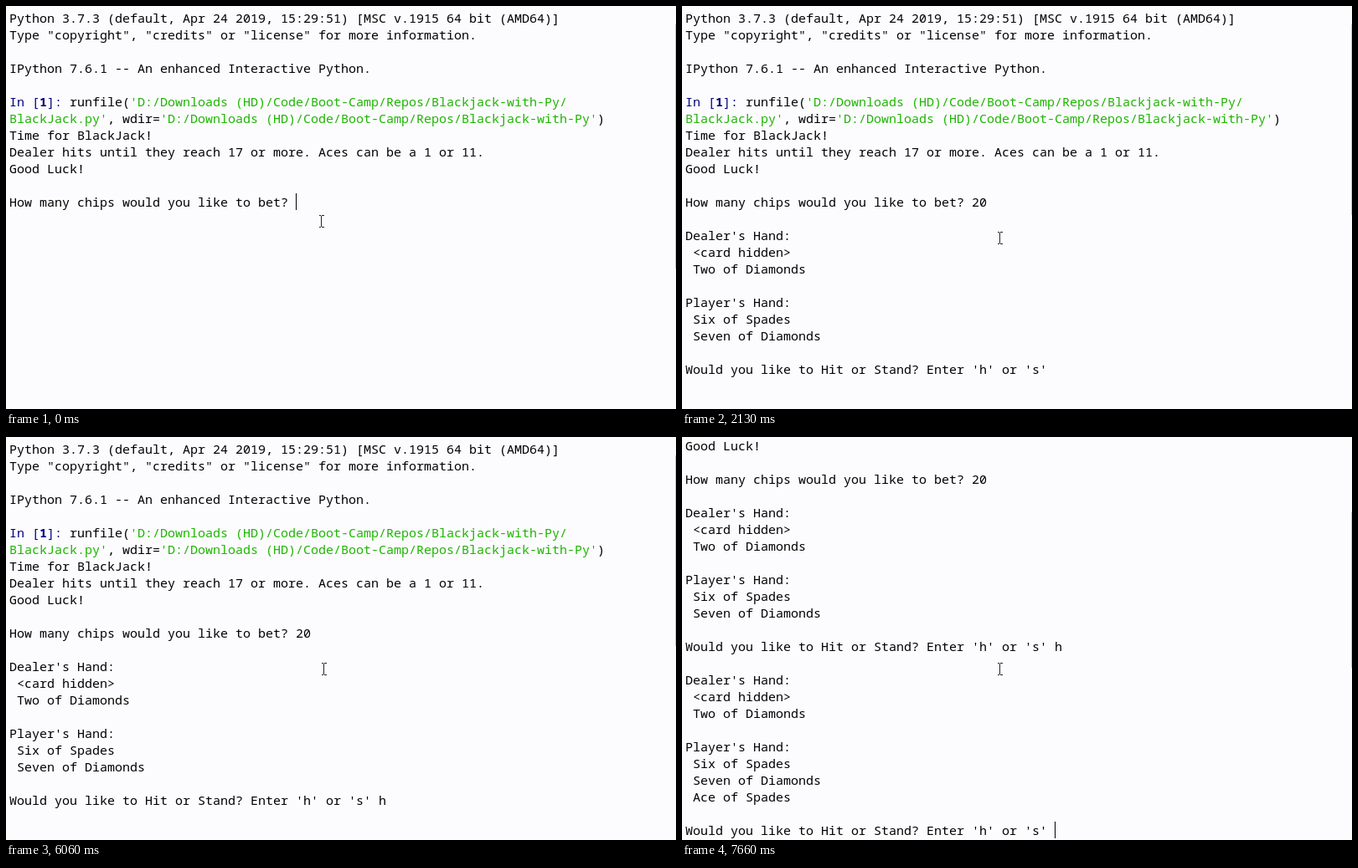
An HTML page that plays this animation: 800 by 482 pixels, repeating every 8000 ms.

```html
<!DOCTYPE html>
<html lang="en">
<head>
<meta charset="utf-8">
<title>Blackjack console</title>
<style>
  html, body { margin: 0; width: 100%; height: 100%; overflow: hidden; background: #fcfcfe; }
  #stage { position: relative; width: 800px; height: 482px; overflow: hidden; }
  pre {
    position: absolute; left: 4px; top: 4px; margin: 0;
    font: 15px/20px "Noto Sans Mono", "Liberation Mono", monospace;
    font-variant-ligatures: none; color: #000;
  }
  .prompt { color: #000080; }
  .string { color: #1db500; }
  #caret { position: absolute; width: 1px; height: 20px; background: #000; }
  #thumb { position: absolute; left: 799px; width: 1px; background: #cdcdcf; }
  #pointer { position: absolute; left: 0; top: 0; }
</style>
</head>
<body>
<div id="stage">
<pre id="console">Python 3.7.3 (default, Apr 24 2019, 15:29:51) [MSC v.1915 64 bit (AMD64)]
Type "copyright", "credits" or "license" for more information.

IPython 7.6.1 -- An enhanced Interactive Python.

<span class="prompt">In [<b>1</b>]:</span> runfile(<span class="string">'D:/Downloads (HD)/Code/Boot-Camp/Repos/Blackjack-with-Py/
BlackJack.py'</span>, wdir=<span class="string">'D:/Downloads (HD)/Code/Boot-Camp/Repos/Blackjack-with-Py'</span>)
Time for BlackJack!
Dealer hits until they reach 17 or more. Aces can be a 1 or 11.
Good Luck!

How many chips would you like to bet? <span id="session"></span><span id="caret"></span></pre>
<div id="thumb"></div>
<svg id="pointer" width="8" height="15" shape-rendering="crispEdges">
  <path d="M0.5 .5H3M4 .5H6.5M3.5 1V14M0.5 14.5H3M4 14.5H6.5" fill="none" stroke="#222"/>
</svg>
</div>
<script>
const LOOP = 8000;
const $ = id => document.getElementById(id);

const deal = (...cards) => `

Dealer's Hand:
 <card hidden>
 Two of Diamonds

Player's Hand:
${cards.map(card => ` ${card}\n`).join("")}
Would you like to Hit or Stand? Enter 'h' or 's' `;

// [time, text added to the session]
const output = [
  [1660, "2"],
  [1730, "0"],
  [2130, deal("Six of Spades", "Seven of Diamonds")],
  [5930, "h"],
  [6260, deal("Six of Spades", "Seven of Diamonds", "Ace of Spades")],
];

// Times at which the caret flips, starting visible
const caretFlips = [
  193, 730, 1260, 1660, 1800,
  2330, 2860, 3400, 3930, 4460, 5000, 5530, 6060,
  6600, 7130, 7660,
];

// [time, scroll offset, thumb top, thumb bottom]
const scrolls = [[0, 0, 22, 314], [2130, 0, 22, 250], [6260, 184, 90, 276]];

// [time, x, y]
const pointerPath = [[0, 373, 250], [60, 374, 259], [130, 376, 270], [193, 376, 273], [260, 376, 270]];

const latest = (steps, t) => steps.filter(([start]) => start <= t).pop();

function render(t) {
  const text = output.filter(([start]) => start <= t).map(([, added]) => added).join("");
  if ($("session").textContent !== text) $("session").textContent = text;

  const flips = caretFlips.filter(start => start <= t).length;
  $("caret").style.visibility = flips % 2 ? "hidden" : "visible";

  const [, offset, top, bottom] = latest(scrolls, t);
  $("console").style.top = `${4 - offset}px`;
  $("thumb").style.top = `${top}px`;
  $("thumb").style.height = `${bottom - top}px`;

  const [, x, y] = latest(pointerPath, t);
  $("pointer").style.transform = `translate(${x}px, ${y}px)`;
}

const begin = performance.now();
function tick() {
  render((performance.now() - begin) % LOOP);
  requestAnimationFrame(tick);
}
tick();
</script>
</body>
</html>
```
